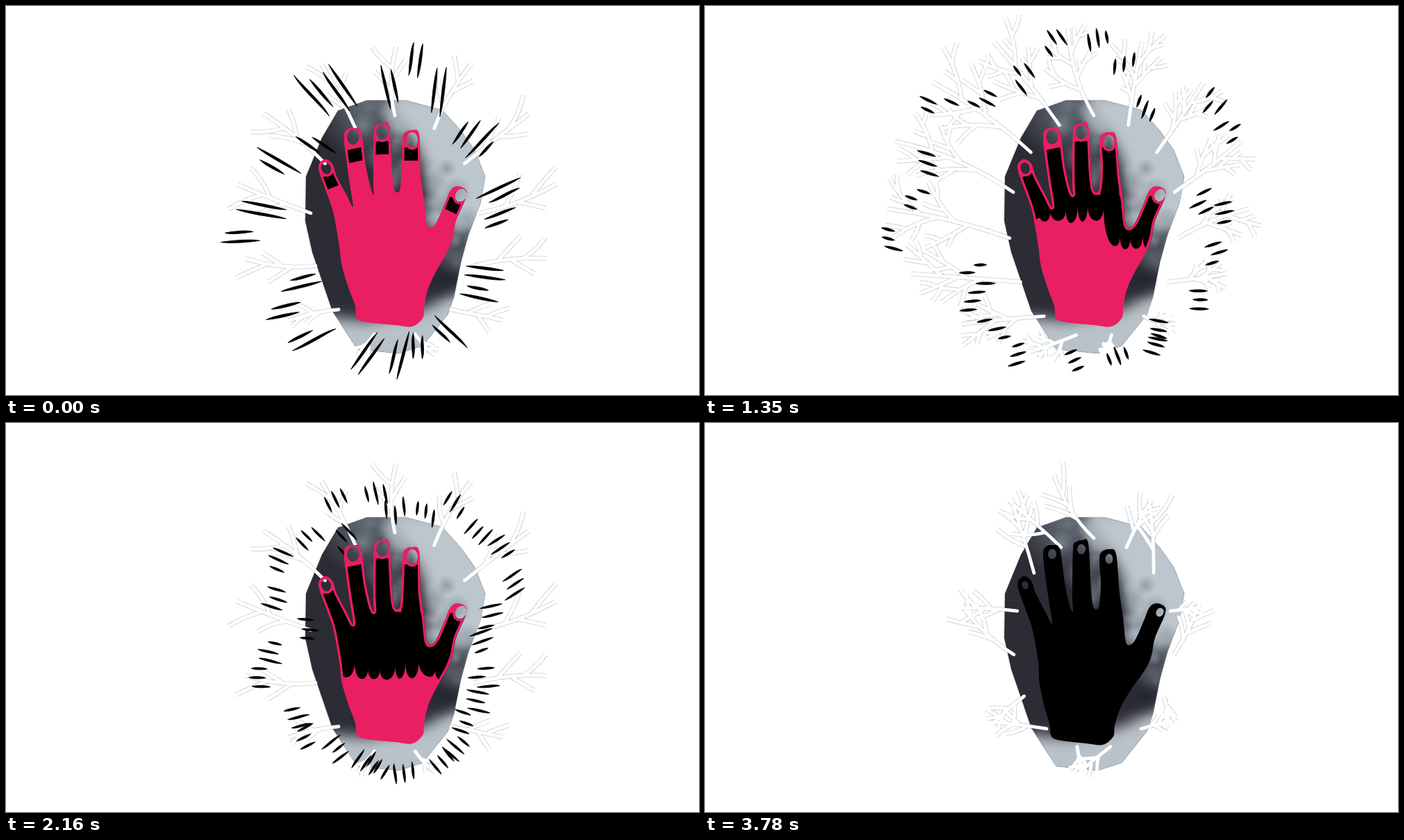
Write an HTML page with a canvas that moves like this. It is 998x561 px and loops after 4050 ms.

```html
<!DOCTYPE html>
<html lang="en">
<head>
<meta charset="utf-8">
<style>
html, body { margin: 0; width: 998px; height: 561px; overflow: hidden; background: #fff; }
canvas { display: block; }
</style>
</head>
<body>
<canvas id="stage" width="998" height="561"></canvas>
<script>
const ctx = document.getElementById('stage').getContext('2d');
const STEP = 270, POSES = 'ABCDABCDABCDBCD', LAST = POSES.length - 1;
const PINK = '#ea1e63', BLACK = '#000', TURN = Math.PI * 2;
const mix = (a, b, t) => a + (b - a) * t;
const clamp = (v, lo, hi) => Math.max(lo, Math.min(hi, v));

function seeded(seed) {
  return () => (seed = (seed * 16807) % 2147483647) / 2147483647;
}
function points(text) {
  const n = text.trim().split(/\s+/).map(Number);
  return n.filter((_, i) => i % 2 === 0).map((x, i) => [x, n[i * 2 + 1]]);
}
function polygon(text) {
  const p = new Path2D();
  points(text).forEach(q => p.lineTo(...q));
  p.closePath();
  return p;
}
function closedSpline(pts) {
  const p = new Path2D(), n = pts.length, at = i => pts[(i + n) % n];
  p.moveTo(...pts[0]);
  for (let i = 0; i < n; i++) {
    const [a, b, c, d] = [at(i - 1), at(i), at(i + 1), at(i + 2)];
    p.bezierCurveTo(b[0] + (c[0] - a[0]) / 6, b[1] + (c[1] - a[1]) / 6,
      c[0] - (d[0] - b[0]) / 6, c[1] - (d[1] - b[1]) / 6, ...c);
  }
  return p;
}
const onEllipse = (a, cx, cy, rx, ry) => [cx + Math.cos(a) * rx, cy + Math.sin(a) * ry];

// A curved branch that sprouts smaller ones on alternating sides
function branch(p, rnd, x, y, angle, len, twigs, depth) {
  const bend = (rnd() - .5) * .5;
  const cx = x + Math.cos(angle + bend) * len / 2, cy = y + Math.sin(angle + bend) * len / 2;
  const ex = x + Math.cos(angle) * len, ey = y + Math.sin(angle) * len;
  p.moveTo(x, y);
  p.quadraticCurveTo(cx, cy, ex, ey);
  if (!depth) return;
  for (let i = 0; i < twigs; i++) {
    const t = mix(.3, .8, (i + rnd() * .5) / twigs), u = 1 - t, side = i % 2 ? 1 : -1;
    branch(p, rnd, u * u * x + 2 * u * t * cx + t * t * ex, u * u * y + 2 * u * t * cy + t * t * ey,
      angle + side * mix(.45, .8, rnd()), len * mix(.32, .5, rnd()), 2, depth - 1);
  }
}

// Trees stand around the egg and reach for an outer ellipse
function forest({ seed, count, root = 1, outer, twigs, depth, sway = 0 }) {
  const p = new Path2D(), rnd = seeded(seed);
  for (let i = 0; i < count; i++) {
    const a = (i / count - .25) * TURN;
    const [x, y] = onEllipse(a, 560, 318, 122 * root, 160 * root);
    const [ex, ey] = onEllipse(a + sway * (i % 2 ? 1 : -1), ...outer);
    branch(p, rnd, x, y, Math.atan2(ey - y, ex - x), Math.hypot(ex - x, ey - y), twigs, depth);
  }
  return p;
}
const whiteTrees = {
  A: forest({ seed: 5, count: 13, outer: [562, 284, 232, 226], twigs: 3, depth: 1 }),
  B: forest({ seed: 17, count: 15, outer: [523, 268, 262, 236], twigs: 4, depth: 2 }),
  C: forest({ seed: 29, count: 15, outer: [541, 267, 292, 262], twigs: 6, depth: 2 }),
  D: forest({ seed: 43, count: 15, root: .95, outer: [540, 287, 172, 218], twigs: 4, depth: 1, sway: .22 })
};
const blackTrees = forest({ seed: 31, count: 22, root: 1.06, outer: [540, 296, 238, 222], twigs: 2, depth: 1 });

// A tapered brush stroke around its middle
function stroke(p, x, y, angle, len, width, curl) {
  const c = Math.cos(angle), s = Math.sin(angle);
  const at = (u, v) => [x + c * u * len - s * v, y + s * u * len + c * v];
  p.moveTo(...at(-.5, 0));
  p.bezierCurveTo(...at(-.3, curl + width * .6), ...at(.3, width * .6 - curl), ...at(.5, 0));
  p.bezierCurveTo(...at(.3, -curl - width * .6), ...at(-.3, curl - width * .6), ...at(-.5, 0));
}
// Groups of parallel strokes that point away from the hand
function burst({ seed, groups, size, len: [min, max], width, outer, inner = .85, stray = .15 }) {
  const p = new Path2D(), rnd = seeded(seed);
  for (let i = 0; i < groups; i++) {
    const a = (i + rnd() * .6) / groups * TURN, reach = rnd();
    const [x, y] = onEllipse(a, 560, 318, 130 * inner, 183 * inner), [ex, ey] = onEllipse(a, ...outer);
    const room = Math.hypot(ex - x, ey - y), angle = Math.atan2(ey - y, ex - x) + (rnd() - .5) * 2 * stray;
    for (let k = 0; k < size; k++) {
      const len = mix(min, max, rnd()), pad = Math.min(.5, len / 2 / room);
      const t = mix(pad, 1 - pad, clamp(reach + (rnd() - .5) * .25, 0, 1)), off = (k - (size - 1) / 2) * 13;
      stroke(p, mix(x, ex, t) - Math.sin(angle) * off, mix(y, ey, t) + Math.cos(angle) * off,
        angle, len, width, len * .06 * (rnd() - .3));
    }
  }
  return p;
}
const dashRing = (seed, outer) =>
  burst({ seed, groups: 24, size: 3, len: [18, 28], width: 4, outer, inner: 1 });
const wide = [527, 276, 284, 246], far = [540, 270, 298, 258], near = [548, 290, 205, 222];
const marks = {
  0: burst({ seed: 3, groups: 22, size: 2, len: [28, 80], width: 4.2, outer: [535, 290, 230, 244] }),
  1: dashRing(11, [530, 284, 258, 236]),
  2: dashRing(23, far),
  3: dashRing(37, near),
  5: dashRing(41, wide),
  6: burst({ seed: 53, groups: 44, size: 1, len: [26, 72], width: 5, outer: [538, 282, 310, 236], stray: .45 }),
  7: dashRing(59, near),
  8: burst({ seed: 61, groups: 28, size: 3, len: [20, 34], width: 3.6, outer: [552, 297, 216, 226] }),
  9: dashRing(67, wide),
  12: dashRing(79, [538, 276, 274, 252]),
  13: dashRing(83, far)
};

const egg = polygon(`478 151 520 136 575 136 628 150 655 180 675 208 690 246 683 285 666 330
  655 370 645 420 636 445 600 490 566 501 506 495 470 440 441 355 431 310 432 246 455 190`);
const sky = polygon('545 125 560 165 590 200 610 250 615 300 650 325 710 320 710 125');
const ground = polygon('460 448 520 454 600 438 660 406 660 520 460 520');

// Dark to light, with seeded clouds along the border
function paintEgg() {
  const rnd = seeded(7);
  const cloud = (x, y, r, rgb, alpha) => {
    const g = ctx.createRadialGradient(x, y, 0, x, y, r);
    g.addColorStop(0, `rgba(${rgb},${alpha})`);
    g.addColorStop(1, `rgba(${rgb},0)`);
    ctx.fillStyle = g;
    ctx.fillRect(x - r, y - r, r * 2, r * 2);
  };
  ctx.save();
  ctx.clip(egg);
  ctx.fillStyle = '#2c2c35';
  ctx.fillRect(425, 130, 270, 380);
  cloud(525, 145, 80, '130,142,152', .7);
  cloud(630, 330, 60, '130,142,152', .6);
  ctx.filter = 'blur(10px)';
  ctx.fillStyle = '#bcc6cc';
  ctx.fill(sky);
  ctx.fillStyle = '#b9c2c8';
  ctx.fill(ground);
  ctx.filter = 'none';
  for (let i = 0; i < 80; i++) {
    const t = rnd(), x = mix(530, 655, t) + (rnd() - .5) * 90, y = mix(145, 375, t) + (rnd() - .5) * 50;
    cloud(x, y, 8 + rnd() * 16, rnd() < .5 ? '70,82,94' : '190,200,207', .35);
  }
  cloud(635, 392, 34, '34,37,46', .8);
  ctx.restore();
}

const handPoints = points(`505 448 503 432 494 408 484 375 480 345 472 300 464 275 452 242 451 228
  460 221 470 228 476 245 490 272 500 290 495 255 490 220 487 190 490 179 500 176 511 182
  518 230 525 262 530 272 529 250 530 182 534 172 543 169 552 174 556 240 559 264 564 269 568 262
  570 230 571 195 574 183 585 179 595 186 597 245 602 280 606 315 612 320 620 312 632 285
  640 266 650 260 662 265 662 277 648 310 643 335 635 355 618 385 607 410 602 435
  600 450 585 462 560 460 515 455`);
const nails = [[461, 234, 7, 9, -.3], [500, 189, 9, 11, 0], [542, 182, 9, 11, 0],
  [585, 193, 8, 11, 0], [655, 273, 8, 10, .5]];
const nailSize = { A: 1, B: .95, C: .85, D: .66 };

function handPath(pose) {
  const slide = pose === 'C' || pose === 'D' ? 1 : 0;
  // The wrist slides left and the index finger sits a little lower
  const place = ([x, y]) => {
    const index = pose !== 'A' && x > 568 && x < 600 && y < 215 ? 3 : 0;
    const wrist = slide * clamp((y - 350) / 80, 0, 1);
    return [x - index - wrist * (x > 550 ? 12 : 7), y + index + wrist * 2];
  };
  const p = closedSpline(handPoints.map(place)), s = nailSize[pose];
  nails.forEach(([x, y, rx, ry, turn]) => {
    const [nx, ny] = place([x, y]);
    p.moveTo(nx + rx * s * Math.cos(turn), ny + rx * s * Math.sin(turn));
    p.ellipse(nx, ny, rx * s, ry * s, turn, 0, TURN);
  });
  return p;
}

// Ink runs down the fingers first, then over the palm in drips
const fingers = [[464, 244, 488, 303], [500, 206, 517, 288], [543, 195, 547, 284],
  [583, 204, 583, 283], [650, 280, 626, 329]];

function paintInk(step) {
  ctx.strokeStyle = ctx.fillStyle = BLACK;
  ctx.lineWidth = 27;
  ctx.lineCap = 'butt';
  fingers.forEach(([x, y, ex, ey]) => {
    const t = mix(19 / Math.hypot(ex - x, ey - y), 1, Math.min(1, step / 4));
    ctx.beginPath();
    ctx.moveTo(x, y);
    ctx.lineTo(mix(x, ex, t), mix(y, ey, t));
    ctx.stroke();
  });
  if (step < 5) return;
  const rnd = seeded(step * 97), level = 284 + (step - 4) * 19;
  ctx.beginPath();
  ctx.moveTo(670, 275);
  ctx.lineTo(465, 270);
  ctx.lineTo(465, level - 12);
  for (let x = 465; x < 650;) {
    const next = x + mix(14, 24, rnd()), base = next > 592 ? Math.max(level, 342) : level;
    ctx.bezierCurveTo(x, base + mix(6, 20, rnd()), next, base + 14, next, base - mix(4, 16, rnd()));
    x = next;
  }
  ctx.fill();
}

function paintHand(step, pose) {
  const hand = handPath(pose);
  ctx.fillStyle = step === LAST ? BLACK : PINK;
  ctx.fill(hand, 'evenodd');
  if (step === LAST) return;
  ctx.save();
  ctx.clip(hand, 'evenodd');
  paintInk(step);
  line(hand, PINK, 6.5);
  ctx.restore();
}

function line(path, color, width, dash = []) {
  ctx.strokeStyle = color;
  ctx.lineWidth = width;
  ctx.lineCap = dash.length ? 'butt' : 'round';
  ctx.setLineDash(dash);
  ctx.stroke(path);
  ctx.setLineDash([]);
}

function paint(step) {
  const pose = POSES[step], dots = [1, 1.4];
  ctx.fillStyle = '#fff';
  ctx.fillRect(0, 0, 998, 561);
  line(whiteTrees[pose], '#8397a2', 6.6, dots);
  line(egg, '#8397a2', 1.4, dots);
  paintEgg();
  line(whiteTrees[pose], '#fff', 4.8);
  if (step === 4) line(blackTrees, BLACK, 4.4);
  if (marks[step]) {
    ctx.fillStyle = BLACK;
    ctx.fill(marks[step]);
    line(marks[step], BLACK, .8);
  }
  paintHand(step, pose);
}

let shown = -1;
function tick() {
  const step = Math.floor(performance.now() / STEP) % POSES.length;
  if (step !== shown) paint(shown = step);
  requestAnimationFrame(tick);
}
tick();
</script>
</body>
</html>
```
